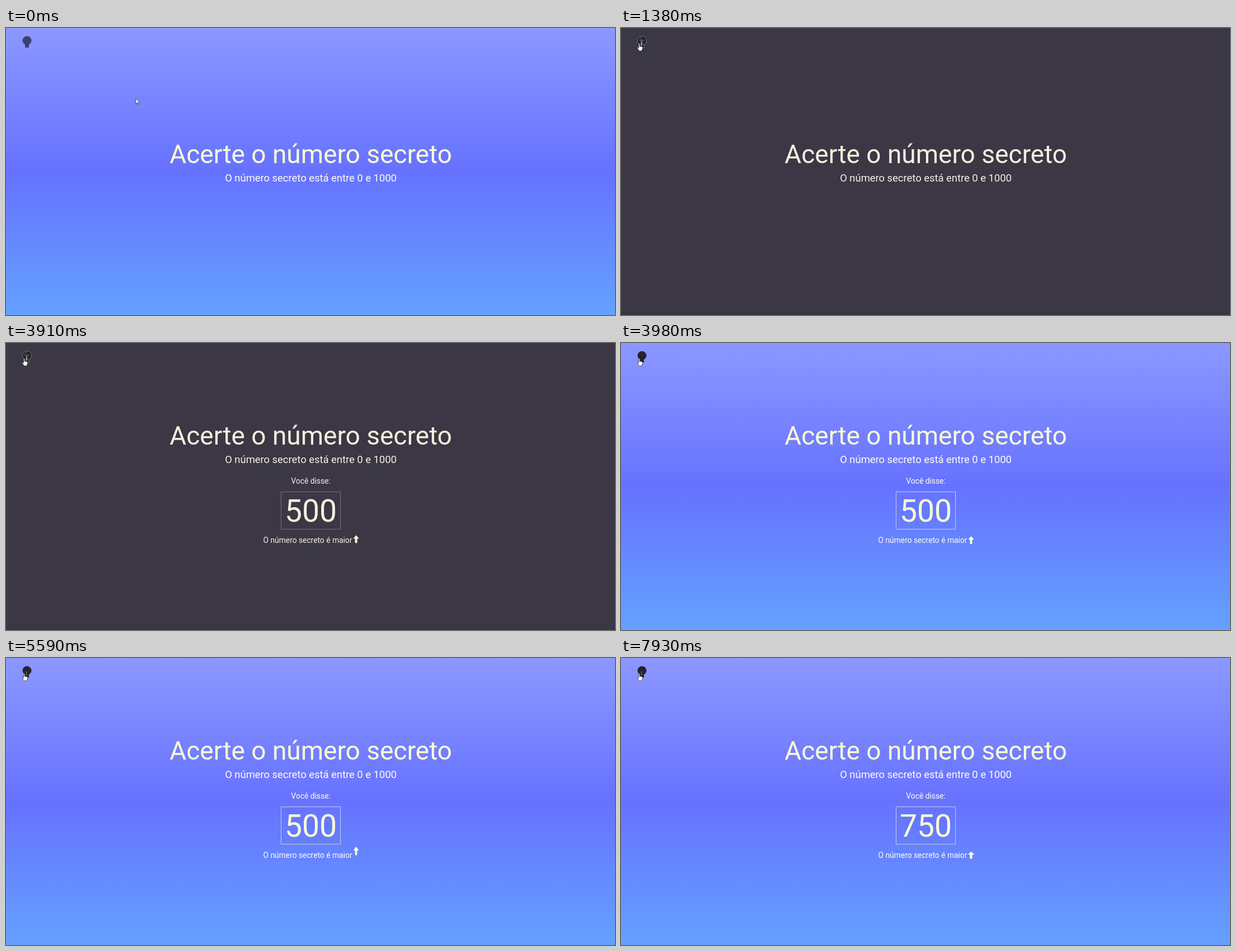
These frames come from a looping animation (1088x514 px, 8 s). An HTML page:

```html
<!DOCTYPE html>
<html lang="pt">
<head>
<meta charset="utf-8">
<style>
  html, body { margin: 0; width: 100%; height: 100%; overflow: hidden; background: #3b3744; }
  svg { display: block; width: 1088px; height: 514px; }
  text { font-family: Roboto, sans-serif; text-anchor: middle; }
  #stage { --bg: url(#sky); --title: #fcfcd6; --text: #fffef2; --line: #c6cbee; }
  #stage.dark { --bg: #3b3744; --title: #f6f0e0; --text: #f6f0e4; --line: #776f7d; }
  #back { fill: var(--bg); }
  .title { fill: var(--title); }
  .text { fill: var(--text); }
  #frame { fill: none; stroke: var(--line); }
  #edge, #outline { display: none; }
  .dark #edge, .dark #outline { display: inline; }
</style>
</head>
<body>
<svg id="stage" viewBox="0 0 1088 514">
  <defs>
    <linearGradient id="sky" x1="0" y1="0" x2="0" y2="1">
      <stop offset="0" stop-color="#8c98ff"/>
      <stop offset=".5" stop-color="#6672ff"/>
      <stop offset="1" stop-color="#64a1ff"/>
    </linearGradient>
    <path id="bulbShape" d="M34 35V29.7A8 8 0 1 1 41 29.7V35Z"/>
  </defs>
  <rect id="back" width="1088" height="514"/>
  <rect id="edge" y="510" width="1088" height="4" fill="#393542"/>

  <g id="heading">
    <text class="title" x="544.5" y="242" font-size="46">Acerte o número secreto</text>
    <text class="text" x="544.5" y="275" font-size="18.4">O número secreto está entre 0 e 1000</text>
  </g>

  <g id="guess">
    <text class="text" x="544.5" y="252" font-size="13.8">Você disse:</text>
    <rect id="frame" x="491.5" y="266.5" width="106" height="67"/>
    <text id="number" class="title" x="544.5" y="320" font-size="55.2">500</text>
    <text class="text" x="539" y="358" font-size="13.8">O número secreto é maior</text>
    <path id="arrow" class="title" d="M0-7L4.8-1.6Q4.8-.8 4-.8H2V6.2Q2 7 1.2 7H-1.2Q-2 7-2 6.2V-.8H-4Q-4.8-.8-4.8-1.6Z"/>
  </g>

  <use id="bulb" href="#bulbShape"/>
  <g id="outline" fill="none" stroke="#9b979f" stroke-width=".7">
    <use href="#bulbShape"/>
    <path d="M33 20Q34.5 17 38 17M33.5 23V21.5H41V23M36 22V30M38.6 22V30M34.5 30H40.5"/>
  </g>
  <path id="caret" d="M36.5 24V32" stroke="#d8d6dc" stroke-width="1"/>
  <circle id="click" cx="31.8" cy="27.8" r="7.3" fill="#d6d63c" opacity=".65"/>
  <path id="pointer" d="M0 0V9.6L2.2 7.6L3.6 10.8L5.2 10.1L3.8 7H6.8Z" fill="#fff" stroke="#2a2a3a" stroke-width=".8"/>
  <path id="hand" d="M-.9.9Q0-.6 1 .9V5L5.4 6Q6.6 6.4 6.4 7.8L5.4 11.4Q5 13.4 3 13.4H1.2Q-.2 13.4-1 12L-3 8.6Q-3.4 7-2 7L-.6 8.4Z"
    fill="#fffdf0" stroke="#2a2a32" stroke-width=".8"/>
</svg>
<script>
const LOOP = 8000, STEP = 70;
const DARK_ON = 1380, GUESS = 3380, DARK_OFF = 3980, SECOND = 6900;
const anchors = [0, 120, 330, 660, 1300, 1380, 3380, 3910, 3980, 4330, 5380, 6410, 7190, 7260, 7800, 7930];
// time, scale x, scale y, lift in px
const bounce = [
  [0, 1, 1, 0], [.1, 1.1, .9, 0], [.3, .9, 1.1, -6.9],
  [.5, 1.05, .95, 0], [.57, 1, 1, -1.73], [.64, 1, 1, 0], [1, 1, 1, 0]
];

const el = id => document.getElementById(id);
const show = (id, on) => el(id).setAttribute('visibility', on ? 'visible' : 'hidden');
const move = (id, x, y, extra = '') => el(id).setAttribute('transform', `translate(${x} ${y}) ${extra}`);
const mix = (a, b, k) => a + (b - a) * k;

// cubic-bezier(.28, .84, .42, 1)
function ease(x) {
  const curve = (a, b, u) => 3 * a * u * (1 - u) ** 2 + 3 * b * u * u * (1 - u) + u ** 3;
  let lo = 0, hi = 1;
  for (let i = 0; i < 20; i++) {
    const u = (lo + hi) / 2;
    if (curve(.28, .42, u) < x) lo = u; else hi = u;
  }
  return curve(.84, 1, lo);
}

function bounceAt(p) {
  const i = bounce.findIndex(k => k[0] > p);
  const a = bounce[i - 1], b = bounce[i];
  const k = ease((p - a[0]) / (b[0] - a[0]));
  return [1, 2, 3].map(n => mix(a[n], b[n], k));
}

function snap(t) {
  const a = anchors.filter(v => v <= t).pop();
  return a + Math.floor((t - a) / STEP) * STEP;
}

function cursorAt(t) {
  if (t < 120) return [231.8, 126.2];
  if (t < 660) {
    const k = Math.min(1, ((t - 120) / STEP + 1) / 4);
    return [mix(231.8, -12, k), mix(126.2, -14, k)];
  }
  const k = Math.min(1, ((t - 660) / STEP + 1) / 7);
  const out = 1 - (1 - k) ** 2;
  return [mix(12, 32.4, out), mix(-8, 27.6, out)];
}

function draw(t) {
  const q = snap(t);
  const dark = t >= DARK_ON && t < DARK_OFF;
  el('stage').setAttribute('class', dark ? 'dark' : '');

  const [x, y] = cursorAt(q);
  const hover = x > 28 && x < 46 && y > 14 && y < 36;
  show('pointer', !hover);
  show('hand', hover);
  move('pointer', x, y);
  move('hand', x, y);
  show('click', t >= 1300 && t < DARK_ON);
  el('bulb').setAttribute('fill', !hover ? '#3c3f72' : dark ? '#201e25' : t < DARK_ON ? '#1c1c22' : '#25232f');
  show('caret', t >= DARK_ON && Math.floor((t - 1820) / 538) % 2 !== 0);
  el('caret').setAttribute('opacity', dark ? 1 : .55);

  const open = t >= GUESS;
  show('guess', open);
  move('heading', 0, open ? -60 : 0);
  if (open) {
    const second = t >= SECOND;
    el('number').textContent = second ? '750' : '500';
    const start = second ? 6890 : 3340;
    const [sx, sy, lift] = bounceAt(Math.max(0, q - start) % 1000 / 1000);
    move('arrow', 625.5, 353, `scale(${sx} ${sy}) translate(0 ${lift})`);
  }
}

const begin = performance.now();
function tick() {
  draw((performance.now() - begin) % LOOP);
  requestAnimationFrame(tick);
}
tick();
</script>
</body>
</html>
```
